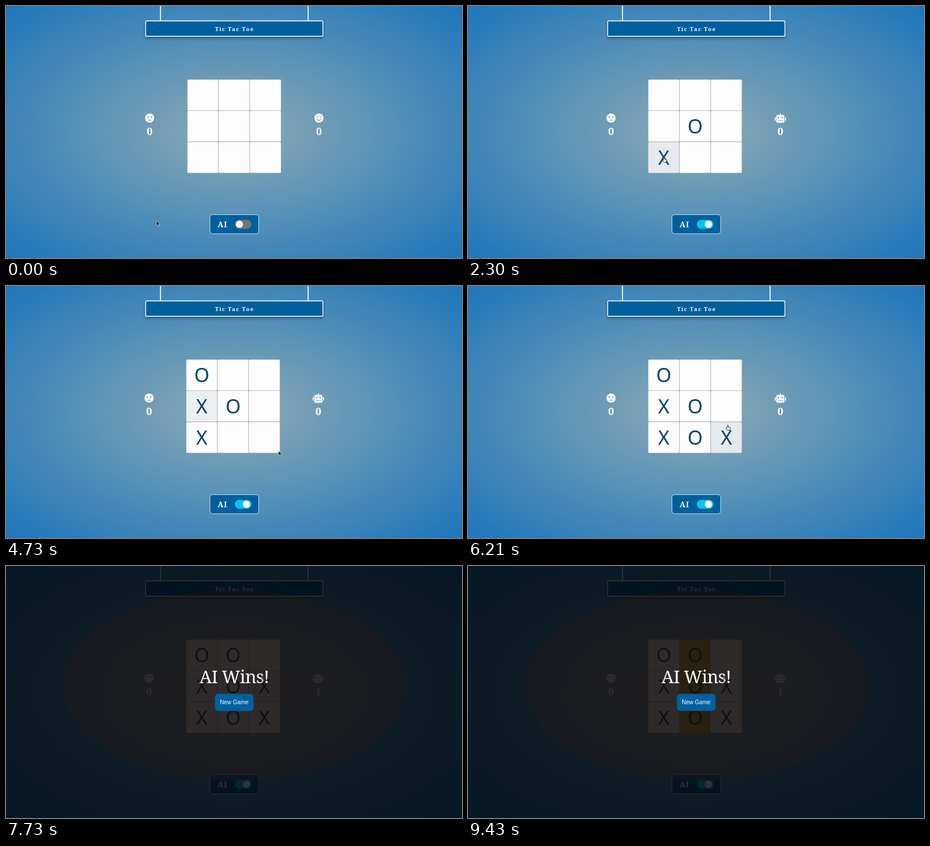
Animation of 800x443 px, one loop 9460 ms. Source, as an HTML page:

```html
<!DOCTYPE html>
<html lang="en">
<head>
<meta charset="utf-8">
<title>Tic Tac Toe</title>
<style>
html, body { margin: 0; width: 100%; height: 100%; overflow: hidden; background: #2378b9; }
svg { display: block; width: 100vw; height: 100vh; }
text { text-anchor: middle; user-select: none; }
.serif { font-family: "Noto Serif", serif; fill: #fff; }
.bold { font-weight: 700; }
.mark { font: 34px "Noto Sans", sans-serif; fill: #00426b; }
.panel { fill: #00609e; stroke: #fff; }
.cut { fill: none; stroke: #6d9fbb; stroke-width: 1.1; stroke-linecap: round; }
.dot { fill: #6d9fbb; }
</style>
</head>
<body>
<svg id="stage" viewBox="0 0 800 443" preserveAspectRatio="none">
  <defs>
    <radialGradient id="sky" gradientUnits="userSpaceOnUse" r="1" cx="0" cy="0"
      gradientTransform="translate(400 221.5) scale(566 313)">
      <stop offset="0" stop-color="#8caab3"/>
      <stop offset="1" stop-color="#1d76bc"/>
    </radialGradient>
    <filter id="drop" x="-10%" y="-50%" width="120%" height="220%">
      <feDropShadow dx="0" dy="3" stdDeviation="2.5" flood-color="#123" flood-opacity=".45"/>
    </filter>
  </defs>

  <rect width="800" height="443" fill="url(#sky)"/>
  <path d="M271 0V26M530 0V26" stroke="#fff" stroke-width="1.7"/>
  <rect class="panel" x="245" y="26.2" width="311" height="27" rx="2" stroke-width="1.4" filter="url(#drop)"/>
  <text class="serif bold" x="401" y="43.7" font-size="9.5" letter-spacing="1.4">Tic Tac Toe</text>

  <g id="board"></g>

  <g id="scores">
    <g transform="translate(252 197)">
      <circle r="8" fill="#fff"/>
      <path class="cut" d="M-4.4-3L-1.5-1.6M4.4-3L1.5-1.6M-2.6 4.4Q0 1.8 2.6 4.4"/>
      <circle class="dot" cx="-2.6" cy="-.8" r="1"/>
      <circle class="dot" cx="2.6" cy="-.8" r="1"/>
    </g>
    <text class="serif bold" x="252" y="227" font-size="18">0</text>
    <g id="wink" transform="translate(549 197)">
      <circle r="8" fill="#fff"/>
      <path class="cut" d="M-4 2.2Q0 6.2 4 2.2M1.4-1.5Q2.8-3 4.3-1.5"/>
      <circle class="dot" cx="-2.7" cy="-1.8" r="1.1"/>
    </g>
    <g id="robot" transform="translate(549 197)">
      <rect x="-1" y="-8" width="2" height="4" fill="#fff"/>
      <rect x="-7" y="-5.6" width="14" height="13.8" rx="2" fill="#fff"/>
      <path d="M-9-1.5V4.5M9-1.5V4.5" stroke="#fff" stroke-width="1.8"/>
      <circle class="dot" cx="-3" cy="-1" r="1.5"/>
      <circle class="dot" cx="3" cy="-1" r="1.5"/>
      <path class="dot" d="M-4 3.8h2v1.4h-2zM-1 3.8h2v1.4h-2zM2 3.8h2v1.4h-2z"/>
    </g>
    <text id="rival" class="serif bold" x="549" y="227" font-size="18">0</text>
  </g>

  <rect class="panel" x="357.8" y="366.8" width="85.5" height="33.6" rx="4.5" stroke-opacity=".8"/>
  <text class="serif bold" x="380" y="388.8" font-size="13.5" letter-spacing="1">AI</text>
  <rect id="track" x="401.6" y="376" width="29" height="15.4" rx="7.7"/>
  <circle id="knob" cy="383.7" r="6.4" fill="#fcfcfc"/>

  <g id="result">
    <rect width="800" height="443" fill="#000" fill-opacity=".8"/>
    <ellipse cx="401" cy="210" rx="303" ry="168" fill="#281a18" fill-opacity=".3"/>
    <text class="serif" x="400.5" y="206" font-size="31" letter-spacing="-.7">AI Wins!</text>
    <rect x="366.6" y="224.8" width="67.6" height="30" rx="6" fill="#0061a1"/>
    <text x="400.3" y="243.4" font-size="10" fill="#fff" font-family="Liberation Sans, Arial, sans-serif">New Game</text>
  </g>

  <g id="pointer">
    <path id="arrow" d="M0 0V8L1.9 6.4 3.2 9.3 4.5 8.7 3.2 5.9H5.8Z" fill="#000" stroke="#fff" stroke-width=".6"/>
    <path id="hand" d="M-1 .6Q0-.6 1 .6V3.2L4.3 4Q5.2 4.5 4.8 6L4 8.6H-.7L-3.1 5.6Q-3 4.2-1 5.2Z"
      fill="#fff" stroke="#111" stroke-width=".9"/>
    <g id="beam" fill="none">
      <path d="M-1.5-3.5Q0-3.5 0-2.5 0-3.5 1.5-3.5M0-2.5V2.5M-1.5 3.5Q0 3.5 0 2.5 0 3.5 1.5 3.5" stroke="#fff" stroke-width="2"/>
      <path d="M-1.5-3.5Q0-3.5 0-2.5 0-3.5 1.5-3.5M0-2.5V2.5M-1.5 3.5Q0 3.5 0 2.5 0 3.5 1.5 3.5" stroke="#222"/>
    </g>
  </g>
</svg>
<script>
const LOOP = 9460, TOGGLE = 1110, WIN = 7715;
const $ = id => document.getElementById(id);
const clamp = v => Math.min(1, Math.max(0, v));
const smooth = v => (v = clamp(v), v * v * (3 - 2 * v));
const mix = (a, b, k) => a + (b - a) * k;
const blend = (a, b, k) => `rgb(${a.map((v, i) => Math.round(mix(v, b[i], k)))})`;
const show = (node, on) => node.setAttribute('visibility', on ? 'visible' : 'hidden');

// cell index, symbol, time placed
const moves = [
  [6, 'X', 2295], [4, 'O', 2295],
  [3, 'X', 3515], [0, 'O', 3515],
  [8, 'X', 5325], [7, 'O', 5325],
  [5, 'X', WIN], [1, 'O', WIN]
];
// cell index: entered, left
const hovers = { 6: [1880, 3010], 3: [2990, 4570], 8: [4735, 6420], 5: [6420, WIN] };
const winners = [1, 4, 7];
// time, x, y
const path = [
  [30, 264, 378], [490, 414, 383], [1250, 414, 383], [1460, 401, 362],
  [1640, 392, 340], [2120, 344, 266], [2490, 344, 266], [3090, 345, 203],
  [4480, 345, 206], [4730, 478, 290], [5180, 459, 268], [5900, 459, 268],
  [6650, 450, 206], [7090, 449, 200]
];
const shapes = [
  [0, 'arrow'], [420, 'hand'], [1490, 'arrow'], [1880, 'hand'],
  [4590, 'arrow'], [4790, 'hand'], [7060, 'beam']
];

function add(parent, tag, attrs, text = '') {
  const node = document.createElementNS('http://www.w3.org/2000/svg', tag);
  for (const key in attrs) node.setAttribute(key, attrs[key]);
  node.textContent = text;
  return parent.appendChild(node);
}

const board = $('board');
add(board, 'rect', { x: 318, y: 129, width: 165, height: 165, rx: 2, fill: '#a3a8a9' });
const cells = Array.from({ length: 9 }, (_, i) => add(board, 'rect', {
  x: 318.4 + i % 3 * 54.9, y: 129.4 + Math.floor(i / 3) * 54.9,
  width: 54, height: 54, rx: 1.5
}));
const marks = moves.map(([i, symbol, time]) => ({
  time,
  node: add(board, 'text', {
    class: 'mark', x: 345.5 + i % 3 * 55, y: 168.6 + Math.floor(i / 3) * 55
  }, symbol)
}));

function cellColor(i, t) {
  const [enter, leave] = hovers[i] || [LOOP, LOOP];
  const hover = clamp((t - enter) / 450) - clamp((t - leave) / 450);
  if (winners.includes(i)) return blend([253, 253, 253], [196, 188, 50], smooth((t - 7850) / 1100));
  return blend([253, 253, 253], [228, 233, 237], hover);
}

function pointerAt(t) {
  const next = path.findIndex(p => p[0] > t);
  if (next === 0) return path[0].slice(1);
  if (next < 0) return path[path.length - 1].slice(1);
  const [t0, x0, y0] = path[next - 1], [t1, x1, y1] = path[next];
  const k = smooth((t - t0) / (t1 - t0));
  return [mix(x0, x1, k), mix(y0, y1, k)];
}

function render(t) {
  const on = t >= TOGGLE, won = t >= WIN;
  const k = smooth((t - TOGGLE) / 400);
  board.setAttribute('transform', `translate(${on ? -2 : 0})`);
  $('scores').setAttribute('transform', `translate(${on ? -1 : 0})`);
  show($('wink'), !on);
  show($('robot'), on);
  show($('result'), won);
  $('rival').textContent = won ? 1 : 0;
  $('track').setAttribute('fill', blend([117, 117, 117], [8, 196, 234], k));
  $('knob').setAttribute('cx', mix(409.5, 422, k));
  cells.forEach((cell, i) => cell.setAttribute('fill', cellColor(i, t)));
  marks.forEach(mark => show(mark.node, t >= mark.time));

  $('pointer').setAttribute('transform', `translate(${pointerAt(t)})`);
  const shape = shapes.filter(s => s[0] <= t).pop()[1];
  for (const id of ['arrow', 'hand', 'beam']) show($(id), id === shape);
}

const start = performance.now();
function tick() {
  render((performance.now() - start) % LOOP);
  requestAnimationFrame(tick);
}
tick();
</script>
</body>
</html>
```
